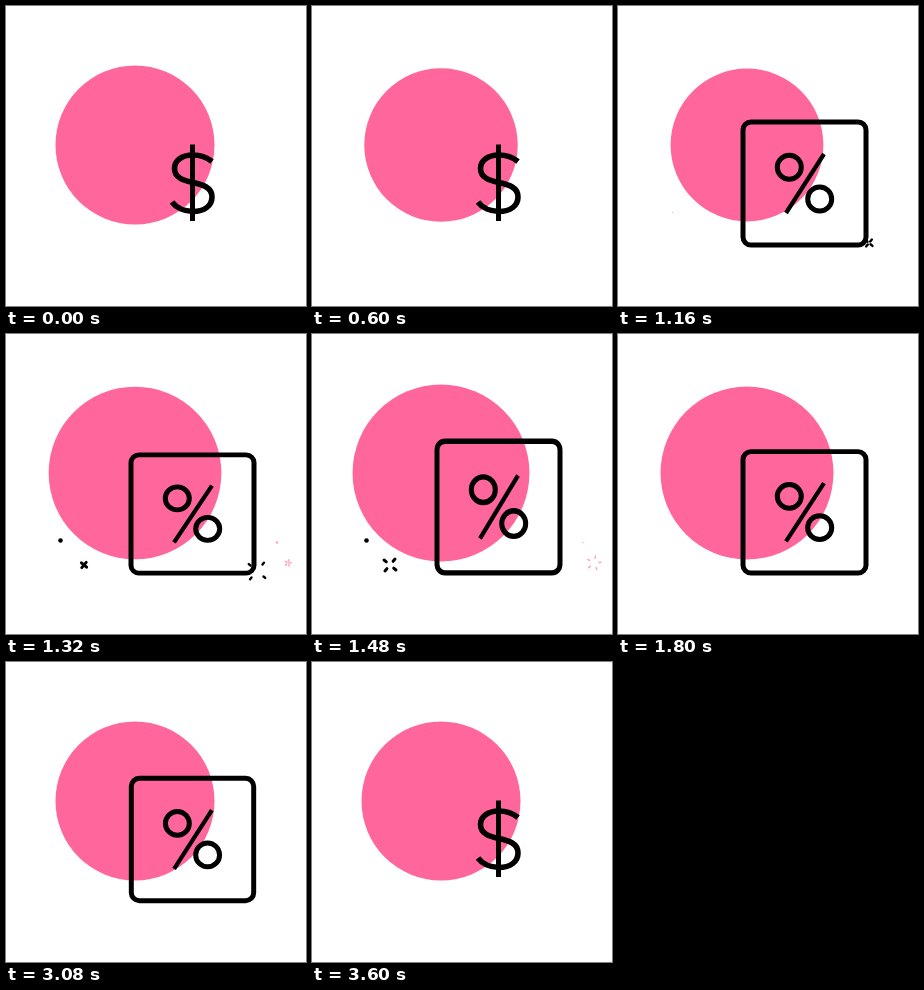
An HTML page for the animation above (4 s loop, 300x300 px).

```html
<!DOCTYPE html>
<html lang="en">
<head>
<meta charset="utf-8">
<title>Dollar to percent</title>
<style>
  html, body { margin: 0; width: 100%; height: 100%; overflow: hidden; background: #fff; }
  svg { display: block; width: 100vw; height: 100vh; }
  .ink { fill: none; stroke: #000; stroke-width: 5; }
</style>
</head>
<body>
<svg viewBox="0 0 300 300">
  <circle id="disc" cx="129" cy="139" r="79.5" fill="#ff669b"/>
  <g id="dollar" class="ink">
    <path stroke-width="5.6" d="M206 155.5C201 151.5 194 149 187 149C175 149 168.5 155 168.5 162.500C168.500 172 178 174.500 187 176.500C196 178.500 206 181 206 191C206 200 198 205.500 187 205.500C178 205.500 170 201.500 166 196"/>
    <path d="M186.500 138.500V215"/>
  </g>
  <g id="card" class="ink">
    <rect x="125" y="116" width="123" height="123" rx="8"/>
    <g id="percent">
      <circle cx="171.300" cy="161.300" r="12"/>
      <circle cx="201.700" cy="193" r="12"/>
      <path stroke-width="4.200" d="M168 207L206 148"/>
    </g>
  </g>
  <g id="sparks" stroke-linecap="round" fill="none"></g>
</svg>
<script>
const LOOP = 4000, STEP = 40, FLOOR = 241.5;
const CENTER = [186.5, 177.5];
const $ = id => document.getElementById(id);
const clamp = x => Math.min(1, Math.max(0, x));
const span = (t, a, b) => clamp((t - a) / (b - a));
const sine = u => (1 - Math.cos(Math.PI * u)) / 2;
const mix = (a, b, u) => a + (b - a) * u;

// Eased interpolation through [time, value] pairs
function keys(t, list) {
  for (let i = 1; i < list.length; i++) {
    const [a, from] = list[i - 1], [b, to] = list[i];
    if (t < b) return mix(from, to, sine(span(t, a, b)));
  }
  return list[list.length - 1][1];
}

function discRadius(t) {
  if (t < 1000) return mix(79.5, 50.5, sine(span(t, 500, 1000)));
  if (t < 1560) return mix(50.5, 88.5, 1 - (1 - span(t, 1000, 1560)) ** 3.4);
  return mix(88.5, 79.5, sine(span(t, 1560, 2320)));
}

const scaleAt = (x, y, sx, sy) =>
  `translate(${x} ${y}) scale(${sx} ${sy}) translate(${-x} ${-y})`;

function show(el, visible) {
  el.setAttribute("visibility", visible ? "visible" : "hidden");
}

// Ticks that fly outwards from a centre, their tails catching up at the end
function burst(t, { x, y, start, end, size, count, turn, color, width }) {
  if (t < start || t >= end) return "";
  const u = span(t, start, end);
  const outer = size * (1 - (1 - u) ** 2);
  const inner = mix(outer * 0.4, outer * 0.95, u * u);
  let d = "";
  for (let i = 0; i < count; i++) {
    const a = turn + i * 2 * Math.PI / count;
    const c = Math.cos(a), s = Math.sin(a);
    d += `M${x + inner * c} ${y + inner * s}L${x + outer * c} ${y + outer * s}`;
  }
  return `<path d="${d}" stroke="${color}" stroke-width="${width}"/>`;
}

function dot(t, { x, y, start, end, r, color }) {
  if (t < start || t >= end) return "";
  const grow = sine(Math.min(1, span(t, start, start + 160), (end - t) / 100));
  return `<circle cx="${x}" cy="${y}" r="${r * grow}" fill="${color}"/>`;
}

const BURSTS = [
  { x: 251, y: 237, start: 1100, end: 1360, size: 11, count: 4, turn: 0.7, color: "#000", width: 2.4 },
  { x: 78, y: 231, start: 1240, end: 1620, size: 9, count: 4, turn: 0.7, color: "#000", width: 3 },
  { x: 282, y: 229, start: 1240, end: 1560, size: 7.5, count: 5, turn: -0.1, color: "#ffa3c4", width: 1.5 }
];
const DOTS = [
  { x: 54.5, y: 206.5, start: 1120, end: 1620, r: 2.3, color: "#000" },
  { x: 271, y: 208.5, start: 1160, end: 1540, r: 1.2, color: "#ffa3c4" }
];

function render(t) {
  $("disc").setAttribute("r", discRadius(t));

  const drop = Math.min(0, -242 + (t - 960) * 1.875);
  const stretch = keys(t, [[1160, 1], [1280, 0.95], [1480, 1.07], [1740, 0.985], [2000, 1]]);
  const shrink = 1 - span(t, 3060, 3340) ** 2;
  $("card").setAttribute("transform",
    `translate(0 ${drop}) ${scaleAt(CENTER[0], FLOOR, 1, stretch)} ${scaleAt(...CENTER, shrink, shrink)}`);
  show($("card"), t > 960 && t < 3340);

  const pop = t < 1080 ? 1 : keys(t, [[3320, 0], [3500, 1.1], [3600, 1]]);
  $("dollar").setAttribute("transform", scaleAt(...CENTER, pop, pop));
  show($("dollar"), t < 1080 || t > 3320);

  $("sparks").innerHTML =
    BURSTS.map(b => burst(t, b)).join("") + DOTS.map(d => dot(t, d)).join("");
}

const began = performance.now();
function tick() {
  const t = (performance.now() - began) % LOOP;
  render(Math.floor(t / STEP) * STEP);
  requestAnimationFrame(tick);
}
tick();
</script>
</body>
</html>
```
